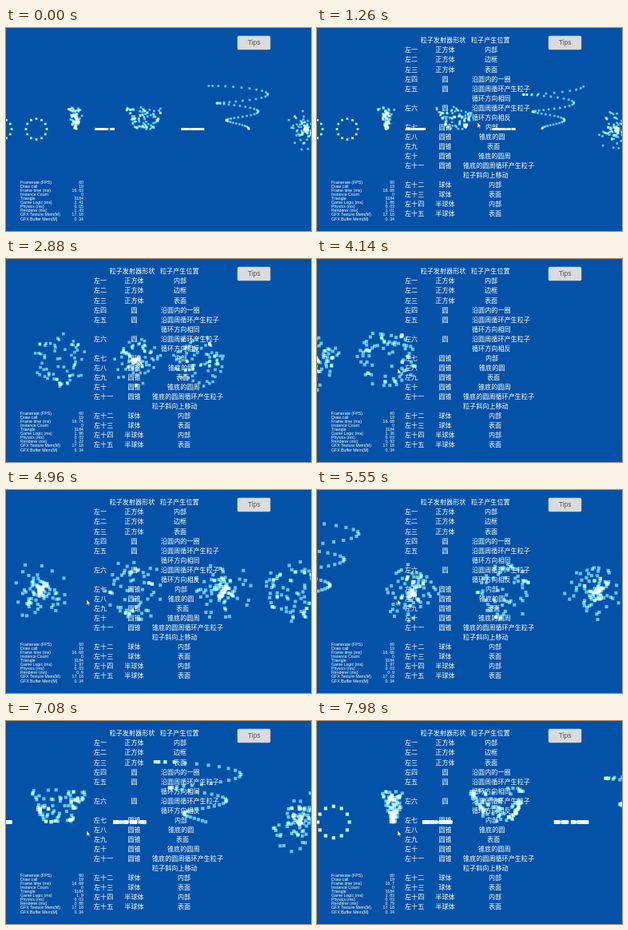
Recreate the animation shown at these times as an HTML page with a canvas. Size 382x254 px, loop 8 s.

```html
<!DOCTYPE html>
<html lang="zh">
<head>
<meta charset="utf-8">
<style>
html, body { margin: 0; width: 100%; height: 100%; overflow: hidden; background: #0352a8; }
canvas { display: block; }
</style>
</head>
<body>
<canvas id="stage" width="382" height="254"></canvas>
<script>
const ctx = document.getElementById('stage').getContext('2d');
const LOOP = 8000, TAU = Math.PI * 2, CENTER = 191, BASE = 126.5;
const TABLE_TIME = 890;

// time, camera x, zoom
const CAMERA = [
  [0, 191, 1], [1680, 191, 1], [2880, 548, 1.31], [3430, 642, 1.5],
  [4200, 658, 1.5], [4960, 474, 1.5], [6070, 378, 1.5], [7980, 150, 1.52]
];
// time, pointer x, pointer y
const POINTER = [
  [70, 340, 60], [600, 312, 20], [900, 312, 20], [1230, 201, 118],
  [1700, 201, 118], [2880, 165, 128], [4100, 101, 137]
];

const rand = (a, b) => {
  const v = Math.sin(a * 127.1 + b * 311.7) * 43758.5453;
  return v - Math.floor(v);
};

function track(keys, t) {
  const i = keys.findIndex(k => k[0] > t);
  if (i < 0) return keys[keys.length - 1].slice(1);
  if (i === 0) return keys[0].slice(1);
  const a = keys[i - 1], b = keys[i], u = (t - a[0]) / (b[0] - a[0]);
  return [1, 2].map(k => a[k] + (b[k] - a[k]) * u);
}

let camX, zoom;
function dot(x, y, strong) {
  const s = 2.7 * zoom, px = CENTER + (x - camX) * zoom - s / 2;
  ctx.fillStyle = strong ? 'rgb(190,180,100)' : 'rgb(98,112,76)';
  ctx.fillRect(px, BASE + y * zoom - s / 2, s, s);
}

// Calls draw(age, r) for every live particle; r(k) gives its own random numbers.
function emit(seed, count, life, t, draw) {
  for (let i = 0; i < count; i++) {
    const clock = t / life + rand(seed, i), born = Math.floor(clock);
    draw(clock - born, k => rand(seed * 7 + i + k * 0.37, born + k * 13));
  }
}

function ring(x, t, dir) {
  const step = 150, n = Math.floor(t / step);
  for (let k = n; k > n - 12; k--) {
    const a = dir * k * TAU / 12;
    dot(x + 13 * Math.cos(a), 13 * Math.sin(a), true);
  }
}

function cone(x, t, count, low, high, surface) {
  emit(x, count, 1800, t, (age, r) => {
    const a = r(1) * TAU, radius = surface ? 0.85 + 0.15 * r(2) : Math.sqrt(r(2));
    const spread = low + (high - low) * age;
    dot(x + Math.cos(a) * radius * spread, -26 * age + Math.sin(a) * radius * 3 * age);
  });
}

function line(x, half, t) {
  emit(x, 34, 1500, t, (age, r) => dot(x + half * Math.cos(r(1) * TAU), 0, true));
}

function helix(x, t) {
  const period = 2520, life = period * 2.5, step = life / 58;
  for (let k = Math.floor(t / step), age; (age = (t - k * step) / life) < 1; k--) {
    const a = k * step / period * TAU, radius = 11 + 30 * age;
    dot(x + radius * Math.cos(a), -54 * age + 4 * age * Math.sin(a));
  }
}

function sphere(x, t, count, inner, outer) {
  emit(x, count, 1600, t, (age, r) => {
    const a = r(1) * TAU, flat = Math.sqrt(1 - (2 * r(2) - 1) ** 2);
    const radius = (inner + (outer - inner) * age) * flat;
    dot(x + radius * Math.cos(a), radius * Math.sin(a));
  });
}

function particles(t) {
  ctx.globalCompositeOperation = 'lighter';
  ring(-6, t, 1);
  ring(38, t, -1);
  cone(87, t, 75, 2, 12, false);
  line(123.5, 11, t);
  cone(174, t, 85, 12, 25, true);
  line(234, 13, t);
  helix(293, t);
  sphere(375, t, 95, 0, 27);
  sphere(453, t, 65, 17, 27);
  sphere(528, t, 95, 0, 26);
  sphere(587, t, 80, 18, 26);
  ctx.globalCompositeOperation = 'source-over';
}

function text(str, x, y, align = 'left') {
  ctx.textAlign = align;
  ctx.fillText(str, x, y);
}

// label, shape, position, left edge of position
const ROWS = [
  ['', '粒子发射器形状', '粒子产生位置', 193],
  ['左一', '正方体', '内部', 210],
  ['左二', '正方体', '边框', 210],
  ['左三', '正方体', '表面', 210],
  ['左四', '圆', '沿圆内的一圈', 194],
  ['左五', '圆', '沿圆周循环产生粒子', 194],
  ['', '', '循环方向相同', 194],
  ['左六', '圆', '沿圆周循环产生粒子', 194],
  ['', '', '循环方向相反', 194],
  ['左七', '圆锥', '内部', 211],
  ['左八', '圆锥', '锥底的圆', 203],
  ['左九', '圆锥', '表面', 213],
  ['左十', '圆锥', '锥底的圆周', 202],
  ['左十一', '圆锥', '锥底的圆周循环产生粒子', 183],
  ['', '', '粒子斜向上移动', 183],
  ['左十二', '球体', '内部', 215],
  ['左十三', '球体', '表面', 215],
  ['左十四', '半球体', '内部', 215],
  ['左十五', '半球体', '表面', 215]
];

function table() {
  ctx.font = '8.1px "Noto Sans CJK SC", "Noto Sans CJK", sans-serif';
  ctx.fillStyle = '#fff';
  ROWS.forEach(([label, shape, place, x], i) => {
    const y = 15.3 + i * 12.05;
    text(label, 110, y);
    text(shape, i ? 160.5 : 158, y, 'center');
    text(place, x, y);
  });
}

// start time, frame time, logic, physics, renderer
const SAMPLES = [
  [0, 16.63, 2.41, 0.05, 1.43], [500, 16.66, 1.92, 0.03, 1.12],
  [1000, 16.68, 1.86, 0.03, 1.01], [1600, 16.7, 2.02, 0.03, 1.16],
  [2500, 16.74, 1.96, 0.03, 1.22], [3200, 16.67, 1.74, 0.03, 1.08],
  [3900, 16.68, 1.36, 0.03, 0.93], [4500, 16.66, 1.97, 0.03, 0.9],
  [5700, 16.68, 2.15, 0.03, 1.01], [6700, 16.69, 1.9, 0.03, 0.88],
  [7500, 16.7, 1.83, 0.03, 0.79]
];

function stats(t) {
  const [, frame, logic, physics, renderer] = SAMPLES.filter(s => s[0] <= t).pop();
  const lines = [
    ['Framerate (FPS)', 60], ['Draw call', 19], ['Frame time (ms)', frame],
    ['Instance Count', 0], ['Triangle', 3184], ['Game Logic (ms)', logic],
    ['Physics (ms)', physics], ['Renderer (ms)', renderer],
    ['GFX Texture Mem(M)', 17.18], ['GFX Buffer Mem(M)', 0.34]
  ];
  ctx.font = '5.2px "Liberation Sans", Arial, sans-serif';
  ctx.fillStyle = '#fff';
  lines.forEach(([label, value], i) => {
    const y = 193.2 + i * 5.1;
    text(label, 18, y);
    text(String(value).replace('.', '. '), 97, y, 'right');
  });
}

function button() {
  ctx.fillStyle = '#d9dbdd';
  ctx.beginPath();
  ctx.roundRect(290, 10, 41, 17, 1.5);
  ctx.fill();
  ctx.strokeStyle = '#b9c3cf';
  ctx.lineWidth = 0.6;
  ctx.stroke();
  ctx.font = '8.5px "Liberation Sans", Arial, sans-serif';
  ctx.fillStyle = '#555';
  text('Tips', 310.7, 19, 'center');
}

function pointer(t) {
  if (t < POINTER[0][0]) return;
  const [x, y] = track(POINTER, t);
  ctx.save();
  ctx.translate(x, y);
  ctx.fillStyle = '#fff';
  ctx.strokeStyle = '#234';
  ctx.lineWidth = 0.5;
  const arrow = new Path2D('M0 0V7L1.6 5.6L2.7 8L3.7 7.5L2.7 5.2H4.8Z');
  ctx.fill(arrow);
  ctx.stroke(arrow);
  ctx.restore();
}

function draw(now) {
  const t = now % LOOP;
  [camX, zoom] = track(CAMERA, t);
  ctx.fillStyle = '#0352a8';
  ctx.fillRect(0, 0, 382, 254);
  ctx.textBaseline = 'middle';
  particles(t);
  if (t >= TABLE_TIME) table();
  stats(t);
  button();
  pointer(t);
}

const start = performance.now();
function tick() {
  draw(performance.now() - start);
  requestAnimationFrame(tick);
}
tick();
</script>
</body>
</html>
```
